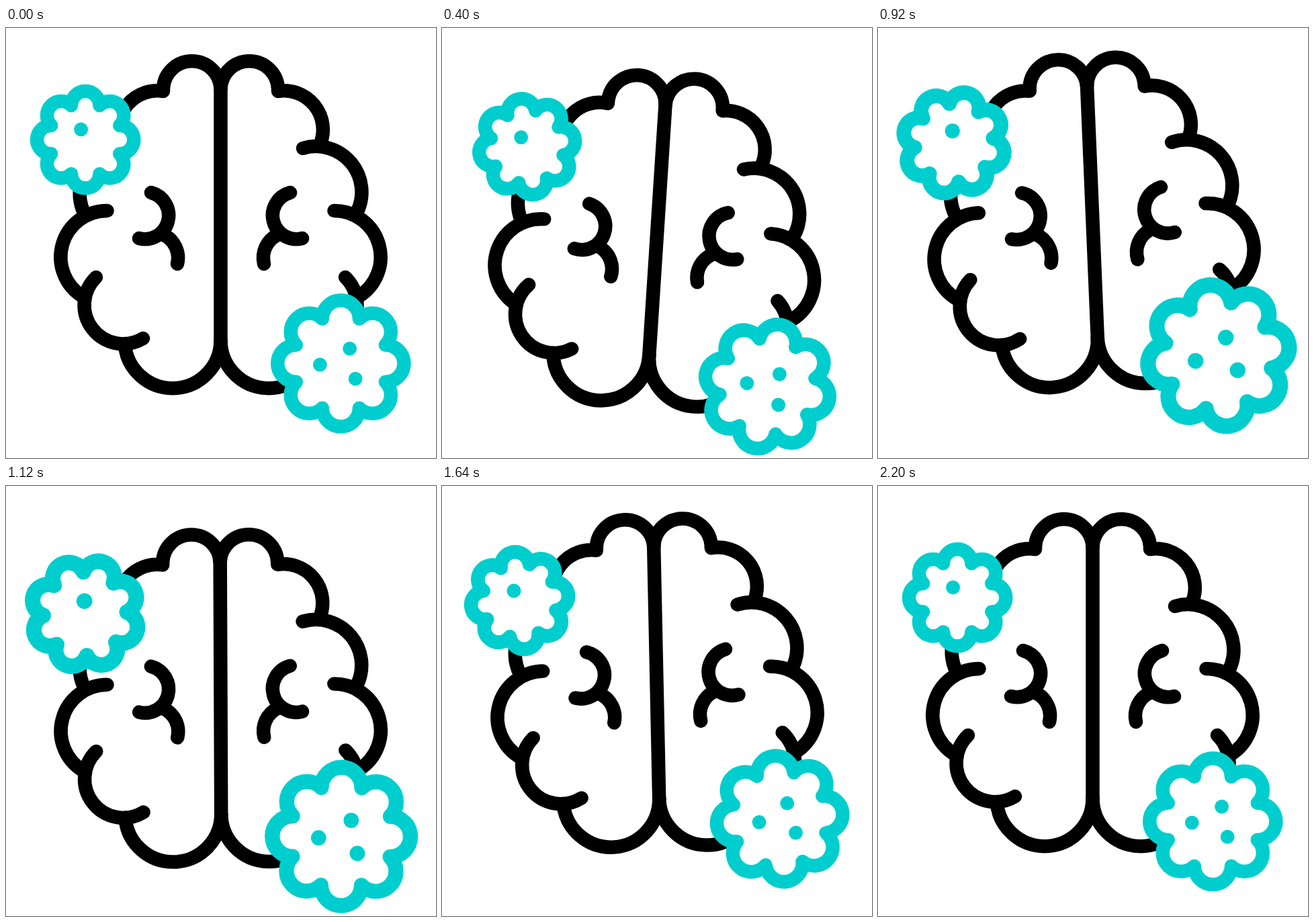
Write an HTML page that moves like this. It is 640 px wide and 640 px high and loops after 2240 ms.

```html
<!DOCTYPE html>
<html lang="en">
<head>
<meta charset="utf-8">
<title>Brain and viruses</title>
<style>
  html, body { margin: 0; width: 100%; height: 100%; overflow: hidden; background: #fff; }
  svg { display: block; width: 100%; height: 100%; }
  path { stroke-width: 20.5; stroke-linejoin: round; }
  .ink { fill: none; stroke: #000; stroke-linecap: round; }
  .shell { fill: #fff; stroke: #00cece; }
  .dot { fill: #00cece; }
</style>
</head>
<body>
<svg viewBox="0 0 640 640">
  <defs>
    <g id="half">
      <path d="M319.5 90A42.8 42.8 0 0 0 234 90V94A58 58 0 0 0 171 172"/>
      <path d="M150.6 272A69 69 0 0 0 114.6 400"/>
      <path d="M134 371A57.8 57.8 0 0 0 204 462"/>
      <path d="M176.7 470A71.5 71.5 0 0 0 319.5 465"/>
      <path d="M216 245A35 35 0 0 1 198 313"/>
      <path d="M235 308A38 38 0 0 1 255 351"/>
    </g>
  </defs>
  <g id="scene">
    <g class="ink">
      <use href="#half"/>
      <use href="#half" transform="translate(639) scale(-1 1)"/>
      <path d="M319.5 88V465"/>
      <path d="M442 179A68 68 0 0 1 522 275"/>
      <path d="M110.3 238A68 68 0 0 0 116 275"/>
    </g>
    <g id="small"></g>
    <g id="big"></g>
  </g>
</svg>
<script>
const LOOP = 2240, STEP = 40, REST = 2200;
const byId = id => document.getElementById(id);

const ease = p => (1 - Math.cos(Math.PI * Math.min(1, Math.max(0, p)))) / 2;

// Swings from 0 through each peak; every gap is the last one times pace.
function swing(t, first, gap, pace, peaks) {
  let from = 0, to = first, value = 0;
  for (const peak of peaks) {
    if (t <= to) return value + (peak - value) * ease((t - from) / (to - from));
    value = peak;
    from = to;
    to = Math.min(REST, to + gap);
    gap *= pace;
  }
  return value;
}

// Grows from 1 by amount, then shrinks back.
const pulse = (t, start, top, end, amount) =>
  1 + amount * (t < top ? ease((t - start) / (top - start)) : ease((end - t) / (end - top)));

// Eight semicircular lobes meeting at notches, centred on the origin.
function drawVirus(id, notch, dots) {
  const lobe = notch * Math.sin(Math.PI / 8);
  let d = "";
  for (let i = 0; i <= 8; i++) {
    const a = (i + 0.5) * Math.PI / 4;
    const point = `${notch * Math.cos(a)} ${notch * Math.sin(a)}`;
    d += i ? `A${lobe} ${lobe} 0 0 1 ${point}` : `M${point}`;
  }
  byId(id).innerHTML = `<path class="shell" d="${d}Z"/>` +
    dots.map(([x, y]) => `<circle class="dot" cx="${x}" cy="${y}" r="10.4"/>`).join("");
}

const place = (id, x, y, spin, size) =>
  byId(id).setAttribute("transform", `translate(${x} ${y}) rotate(${spin}) scale(${size})`);

function render(t) {
  const lift = swing(t, 320, 412, 0.88, [29, -34.7, 23.5, 0]);
  const rock = peaks => swing(t, 340, 460, 1, peaks);
  const tilt = rock([4, -2.95, 0.5, -1.35, 0]);
  byId("scene").setAttribute("transform", `translate(0 ${lift}) rotate(${tilt} 319.5 291.5)`);
  place("small", 118.2, 166.2,
    swing(t, 570, 440, 1.65, [-16.5, 22, -7.5, 0]), pulse(t, 700, 1150, 1750, 0.133));
  place("big", 498.3, 499.2,
    rock([10, -8.6, 2.9, -4.9, 0]), pulse(t, 400, 910, 1520, 0.127));
}

drawVirus("small", 55.2, [[-6.6, -15.3]]);
drawVirus("big", 72, [[-31, 2], [13.3, -22], [21.8, 23]]);

const start = performance.now();
function tick() {
  const t = (performance.now() - start) % LOOP;
  render(Math.floor(t / STEP) * STEP);
  requestAnimationFrame(tick);
}
tick();
</script>
</body>
</html>
```
